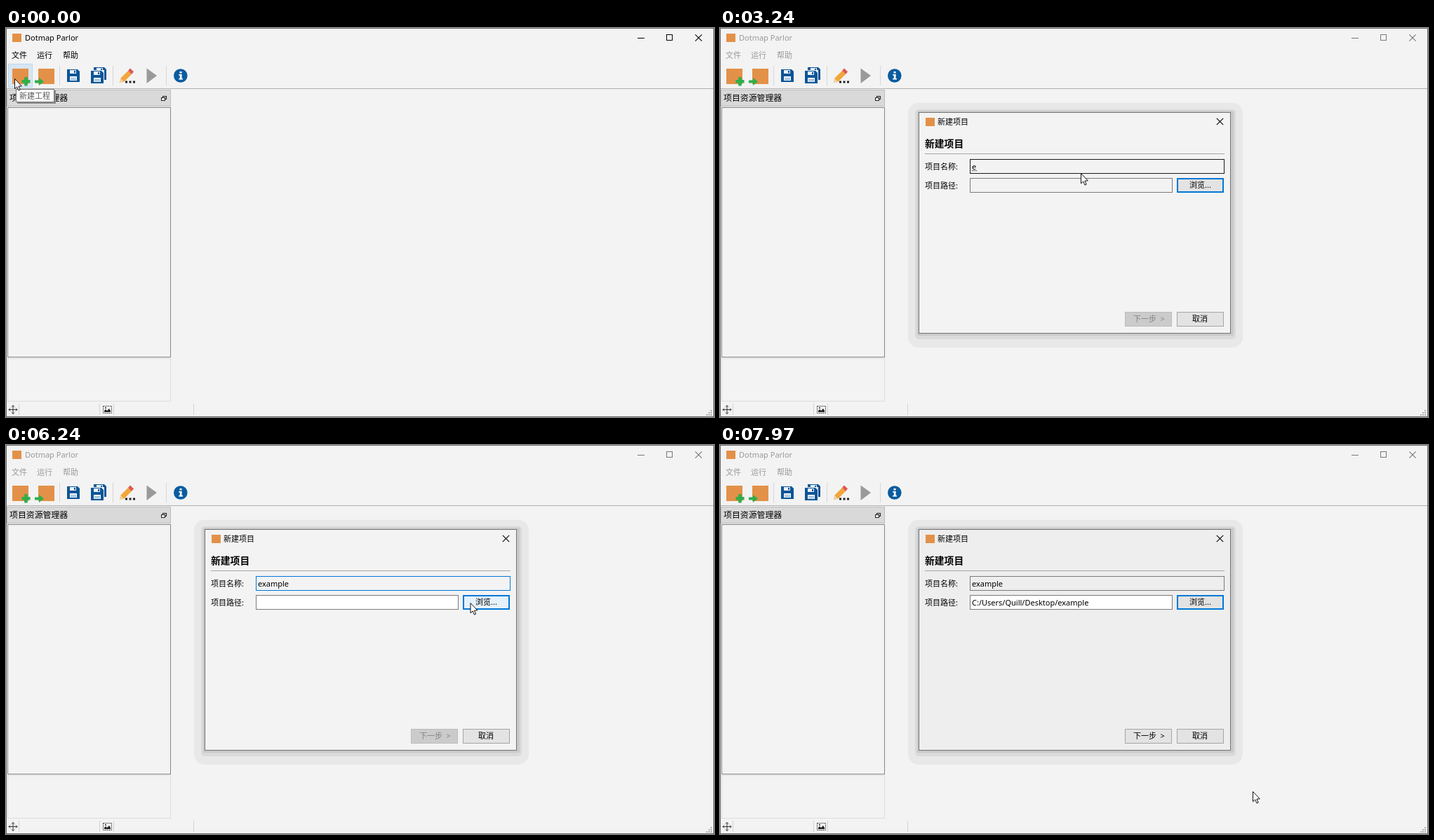
Animation, 1009 px wide and 555 px high, one loop 8 s. Source, as an HTML page with a canvas:

```html
<!DOCTYPE html>
<html lang="zh-CN">
<head>
<meta charset="utf-8">
<title>新建项目</title>
<style>
html, body { margin: 0; width: 100%; height: 100%; overflow: hidden; background: #f3f3f3; }
canvas { display: block; }
</style>
</head>
<body>
<canvas id="stage" width="1009" height="555"></canvas>
<script>
const W = 1009, H = 555, LOOP = 8000;
const FONT = '"Noto Sans", "Noto Sans CJK SC", "Noto Sans CJK", sans-serif';
const APP = 'Dotmap Parlor', LOGO = '#e39148', BLUE = '#0078d7', ICON_BLUE = '#0b5597', FACE = '#f3f3f3';
const screen = document.getElementById('stage').getContext('2d');
const layer = document.createElement('canvas');
layer.width = W;
layer.height = H;
const layerCtx = layer.getContext('2d');
let c = screen;

const clamp = v => Math.max(0, Math.min(1, v));
const easeOut = p => 1 - (1 - clamp(p)) ** 3;
const blink = (t, start) => Math.floor((t - start) / 530) % 2 === 0;

function fill(x, y, w, h, color) {
  c.fillStyle = color;
  c.fillRect(x, y, w, h);
}
// Box with a border that lies inside its bounds.
function box(x, y, w, h, face, edge, weight = 1) {
  fill(x, y, w, h, edge);
  fill(x + weight, y + weight, w - 2 * weight, h - 2 * weight, face);
}
function text(s, x, mid, color = '#000', size = 11, weight = 400) {
  c.font = `${weight} ${size}px ${FONT}`;
  c.fillStyle = color;
  c.fillText(s, x, mid + size * 0.36);
}
function path(points, color, closed) {
  c.beginPath();
  points.forEach(([x, y]) => c.lineTo(x, y));
  if (closed) {
    c.closePath();
    c.fillStyle = color;
    c.fill();
  } else {
    c.strokeStyle = color;
    c.stroke();
  }
}
function stroke(color, width, ...points) {
  c.lineWidth = width;
  path(points, color, false);
}
function shape(color, ...points) {
  path(points, color, true);
}
function disc(x, y, r, color) {
  c.beginPath();
  c.arc(x, y, r, 0, 7);
  c.fillStyle = color;
  c.fill();
}
function cross(x, y, color, r = 4.7) {
  stroke(color, 1.1, [x - r, y - r], [x + r, y + r]);
  stroke(color, 1.1, [x + r, y - r], [x - r, y + r]);
}
function chevron(x, y, dx, dy, color = '#555') {
  stroke(color, 1.1, [x - dx - 2 * dy, y - dy - 2 * dx], [x + dx, y + dy], [x - dx + 2 * dy, y - dy + 2 * dx]);
}
function arrow(x, y, dx, dy, color) {
  const ex = x + dx * 5, ey = y + dy * 5;
  stroke(color, 1.2, [x - dx * 5, y - dy * 5], [ex, ey]);
  stroke(color, 1.2, [ex - dx * 4 - dy * 4, ey - dy * 4 - dx * 4], [ex, ey], [ex - dx * 4 + dy * 4, ey - dy * 4 + dx * 4]);
}
function dropMark(x, y) {
  shape('#1e395b', [x - 4, y - 2], [x + 4, y - 2], [x, y + 2.5]);
}
function button(label, x, y, w, h, textX, { main = false, off = false, hot = false } = {}) {
  const face = off ? '#cbcbcb' : hot ? '#e5f1fb' : '#e3e3e3';
  box(x, y, w, h, face, main ? BLUE : off ? '#bdbdbd' : '#a5a5a5', main ? 2 : 1);
  text(label, textX, y + h / 2, off ? '#858585' : '#000');
}
// Window frame with its stepped drop shadow.
function frame(x, y, w, h, face) {
  [[15, 20, '#e8e8e8'], [5, 8, '#dadada'], [2, 3, '#c9c9c9']].forEach(([out, below, color]) => {
    const above = out - (below - out) / 3;
    c.beginPath();
    c.roundRect(x - out, y - above, w + out * 2 + 2, h + above + below, out);
    c.fillStyle = color;
    c.fill();
  });
  box(x, y, w, h, face, '#737373');
}
function grip(x, y) {
  for (let i = 0; i < 3; i++)
    for (let j = 0; j <= i; j++) fill(x - j * 3, y - (2 - i) * 3, 2, 2, '#b0b0b0');
}

function floppy(x, y, s) {
  shape(ICON_BLUE, [x, y], [x + s - 3, y], [x + s, y + 3], [x + s, y + s], [x, y + s]);
  fill(x + 4, y + 1, s - 9, 5, '#e9f1f8');
  fill(x + s - 8, y + 2, 2, 3, ICON_BLUE);
  fill(x + 4, y + s - 8, s - 8, 6, '#fff');
  fill(x + 5, y + s - 6, s - 10, 1, '#6f9dc4');
  fill(x + 5, y + s - 4, s - 10, 1, '#6f9dc4');
}

function toolbar(t) {
  if (t < 1250) box(3, 51, 35, 34, t < 1050 ? '#d8e6f2' : '#c4dff5', '#bcd9ef');
  const green = '#2fae4b';
  fill(9, 58, 23, 22, LOGO);
  fill(22.5, 74, 12, 4.5, green);
  fill(26.2, 70, 4.5, 12.5, green);
  fill(46, 58, 23, 22, LOGO);
  shape(green, [41, 74.5], [47, 74.5], [47, 71], [54, 76.5], [47, 82], [47, 78.5], [41, 78.5]);
  [76, 152, 228].forEach(x => fill(x, 54, 1, 28, '#d6d6d6'));
  floppy(87, 59, 18);
  floppy(125, 56, 18);
  fill(120, 60, 20, 20, FACE);
  floppy(121, 61, 18);
  shape('#f2a63b', [163, 72], [174, 61], [179, 66], [168, 77]);
  shape('#e0574f', [174, 61], [177, 57.5], [182, 62.5], [179, 66]);
  shape('#f3cfa0', [163, 72], [168, 77], [161.5, 78.5]);
  [170, 175.5, 181].forEach(x => fill(x, 75.5, 3, 3, '#222'));
  shape('#9a9a9a', [200.5, 57.5], [215, 68], [200.5, 79]);
  disc(248.8, 68, 9.8, '#0b5c9f');
  fill(247.5, 62, 3, 2.6, '#fff');
  fill(246.3, 66, 4.2, 1.8, '#fff');
  fill(247.8, 66, 2.7, 6.5, '#fff');
  fill(246.3, 71.8, 5.6, 1.8, '#fff');
}

function mainWindow(t) {
  const active = t < 1250;
  const ink = active ? '#000' : '#999';
  const control = active ? '#000' : '#777';
  box(0, 0, W, H, FACE, '#6c6c6c');
  fill(9, 8, 13, 12, LOGO);
  text(APP, 27, 14, ink);
  fill(900, 14, 10, 1, control);
  c.lineWidth = 1;
  c.strokeStyle = control;
  c.strokeRect(941.5, 9.5, 8, 8);
  cross(987, 14, control);
  text('文件', 8, 39, ink);
  text('运行', 44, 39, ink);
  text('帮助', 81, 39, ink);
  toolbar(t);
  fill(1, 86, W - 2, 1, '#b0b0b0');

  box(1, 88, 234, 24, '#d9d9d9', '#bdbdbd');
  text('项目资源管理器', 5, 100, '#000', 11.9);
  c.strokeStyle = '#222';
  c.strokeRect(223.5, 97.5, 5, 4);
  box(221, 99, 6, 5, '#eee', '#222');
  box(2, 113, 233, 357, FACE, '#858585');
  box(2, 471, 233, 62, FACE, '#dcdcdc');

  [18, 133, 153, 267].forEach(x => fill(x, 536, 1, 16, '#d3d3d3'));
  [[1, 0], [-1, 0], [0, 1], [0, -1]].forEach(([dx, dy]) => {
    const x = 10 + dx * 6, y = 544.5 + dy * 6;
    stroke('#333', 1, [10, 544.5], [x, y]);
    stroke('#333', 1, [x - dx * 2 - dy * 2, y - dy * 2 - dx * 2], [x, y], [x - dx * 2 + dy * 2, y - dy * 2 + dx * 2]);
  });
  c.setLineDash([2, 1]);
  c.strokeStyle = '#444';
  c.strokeRect(138.5, 539.5, 12, 10);
  c.setLineDash([]);
  shape('#222', [140, 548], [140, 546], [142, 544], [144, 546], [147, 543], [149, 546], [149, 548]);
  disc(142, 542, 1, '#222');
  grip(1004, 551);

  if (t < 1050) {
    fill(16, 89, 55, 19, '#8b8b8b');
    box(14, 87, 55, 19, '#fff', '#767676');
    text('新建工程', 19, 97, '#575757');
  }
}

const TYPING = [[3240, 'e'], [3400, 'ex'], [3570, 'exa'], [3760, 'exam'], [3990, 'examp'], [4600, 'example']];

function nameCaretOn(t) {
  if (t < 3240) return blink(t, 1300);
  if (t < 3290) return false;
  if (t < 4600) return t < 4460;
  return t < 4970 || (t >= 5530 && t < 6100);
}

function projectDialog(t) {
  const done = t >= 7700;
  const face = done ? '#eee' : FACE;
  frame(283, 120, 445, 316, face);
  fill(293, 128, 13, 12, LOGO);
  text('新建项目', 310, 134);
  cross(712.5, 133.5, '#000');
  text('新建项目', 292, 165, '#000', 13.8, 700);
  fill(292, 179, 427, 1, '#a6a6a6');
  text('项目名称:', 292, 198);
  text('项目路径:', 292, 225);

  const hovered = t >= 2200 && t < 3290;
  box(356, 187, 363, 21, face, hovered ? '#1a1a1a' : t < 6340 ? BLUE : '#7a7a7a');
  const name = TYPING.reduce((s, [at, typed]) => t >= at ? typed : s, '');
  text(name, 359, 198);
  const nameWidth = c.measureText(name).width;
  const composing = t >= 3240 && t < 4600;
  if (composing) for (let x = 0; x < nameWidth; x += 2) fill(359 + x, 203, 1, 1, '#000');
  if (t < 6340 && nameCaretOn(t)) fill(Math.round(359 + nameWidth) + (name ? 0 : 2), 190, 1, 15, '#000');

  box(356, 214, 289, 21, t < 4600 ? face : '#fff', '#7a7a7a');
  if (done) text('C:/Users/Quill/Desktop/example', 359, 225);
  button('浏览...', 651, 214, 67, 21, 669, { main: true, hot: t > 5760 && t < 6340 });
  button('下一步\u2002>', 577, 405, 67, 21, 589, { off: !done });
  button('取消', 651, 405, 67, 21, 673);
}

function candidates(t) {
  if (t < 3290 || t >= 4600) return;
  const right = t < 3760 ? 976 : W;
  box(360, 207, right - 360, 40, '#fff', '#d0d0d0');
  const words = t < 3400 ? '饿 额 恶 呃 鹅 俄 二' : '恶心 额下 饿下 二线 恶性 鹅行 额线';
  words.split(' ').forEach((word, i) => {
    text(String(i + 1), 374 + i * 84, 227, '#888', 11);
    text(word, 388 + i * 84, 227, i ? '#000' : BLUE, 15);
  });
}

function navItem(label, y, icon) {
  icon(176, y);
  text(label, 188, y);
}
function monitor(x, y) {
  box(x - 7, y - 6, 15, 10, '#5bb8f0', '#3d83b4');
  fill(x - 4, y + 5, 9, 2, '#6d8ba0');
}
function star(x, y) {
  const points = Array.from({ length: 10 }, (_, i) => {
    const r = i % 2 ? 2.6 : 6.3, a = i * Math.PI / 5 - Math.PI / 2;
    return [x + r * Math.cos(a), y + r * Math.sin(a)];
  });
  shape('#2f95dc', ...points);
}
function network(x, y) {
  box(x - 3, y - 6, 10, 8, '#4aa7e0', '#2b77ad');
  disc(x - 2, y + 2, 4.5, '#2d8ac7');
  fill(x + 2, y + 4, 4, 1.5, '#6d8ba0');
}

function folderDialog(t) {
  const steel = '#4c607a', navy = '#1e395b', line = '#dcdcdc';
  frame(147, 92, 799, 423, '#fdfdfd');
  fill(159, 183, 76, 253, '#f4f4f4');
  fill(155, 100, 13, 12, LOGO);
  text('打开文件夹', 173, 106);
  cross(931.5, 105.5, '#000');

  arrow(165, 135, -1, 0, '#c6c6c6');
  arrow(192, 135, 1, 0, '#c6c6c6');
  chevron(213, 135, 0, 1.1, '#c6c6c6');
  arrow(232, 135, 0, -1, '#444');
  box(243, 124, 498, 22, '#fdfdfd', '#d4d4d4');
  fill(248, 127, 11, 15, '#fbdc7e');
  fill(257, 135, 3, 7, '#e9bd4b');
  [270, 326, 370].forEach(x => chevron(x, 135, 1.2, 0));
  text('此电脑', 281, 135);
  text('桌面', 337, 135);
  text('example', 382, 135);
  chevron(712.5, 135, 0, 2);
  fill(721, 125, 1, 20, line);
  c.beginPath();
  c.arc(731, 135, 4, -0.6, 4.6);
  c.strokeStyle = '#555';
  c.lineWidth = 1.3;
  c.stroke();
  shape('#555', [730, 128], [734, 131], [730, 134]);
  box(751, 124, 184, 22, '#fdfdfd', '#d4d4d4');
  text('在 example 中搜索', 760, 135, '#666');
  c.beginPath();
  c.arc(923, 133, 3.2, 0, 7);
  c.strokeStyle = '#444';
  c.stroke();
  stroke('#444', 1.5, [920.7, 135.5], [917, 139]);

  text('组织', 163, 166, navy);
  dropMark(194, 166);
  text('新建文件夹', 225, 166, navy);
  for (let y = 160; y < 172; y += 4) {
    box(860, y, 5, 3, '#fff', '#a9adb3');
    fill(866, y + 1, 4, 1, '#8d949c');
    fill(871, y + 1, 4, 1, '#8d949c');
  }
  dropMark(887, 166);
  disc(924.5, 165.5, 7.3, '#0f63b0');
  text('?', 922, 165.5, '#fff', 11, 700);
  fill(148, 180, 797, 1, '#e4e4e4');

  [['名称', 350], ['修改日期', 588], ['类型', 718], ['大小', 827]].forEach(([s, x]) => text(s, x, 193, steel));
  [581, 712, 821, 893].forEach(x => fill(x, 181, 1, 25, '#e4e4e4'));
  chevron(463, 183, 0, -1.6, '#666');
  text('没有与搜索条件匹配的项。', 575, 227, '#6d6d6d');

  fill(148, 253, 183, 22, '#d9d9d9');
  navItem('快速访问', 206, star);
  navItem('FogShelf - Personal', 235, (x, y) => disc(x, y, 5.5, '#1479cf'));
  navItem('此电脑', 264, monitor);
  navItem('网络', 293, network);

  fill(148, 441, 797, 73, FACE);
  text('文件夹:', 265, 463);
  box(305, 451, 625, 24, '#fff', BLUE);
  if (blink(t, 6360)) fill(309, 455, 1, 16, '#000');
  button('选择文件夹', 745, 481, 93, 21, 764, { main: true, hot: t > 7480 });
  button('取消', 851, 481, 78, 21, 879);
  grip(940, 510);
}

// Draws a window on its own layer, then fades and scales it about its centre.
function popup(draw, t, cx, cy, amount) {
  if (amount <= 0) return;
  if (amount >= 1) return draw(t);
  c = layerCtx;
  c.clearRect(0, 0, W, H);
  draw(t);
  c = screen;
  const s = 0.92 + 0.08 * amount;
  c.globalAlpha = amount;
  c.drawImage(layer, cx - cx * s, cy - cy * s, W * s, H * s);
  c.globalAlpha = 1;
}

const POINTER = [
  [0, 12.5, 72.5], [1780, 12.5, 72.5], [1930, 158, 125], [2030, 211, 155], [2250, 470, 213],
  [2430, 561, 219], [2580, 558, 218], [2630, 556, 218], [2850, 520, 215], [3000, 514.5, 207.5],
  [5480, 514.5, 207.5], [5530, 557.5, 216.5], [5800, 645, 222], [6100, 662, 225.5], [6550, 662, 225.5],
  [6800, 703, 339], [7130, 800, 499], [7250, 806.5, 505.5], [7420, 806.5, 505.5], [7560, 792, 493],
  [7700, 780, 494], [7970, 759.5, 494.5], [8000, 759.5, 494.5]
];

function pointer(t) {
  const i = POINTER.findIndex(([at]) => at > t);
  const [t0, x0, y0] = POINTER[i - 1], [t1, x1, y1] = POINTER[i];
  const p = (t - t0) / (t1 - t0);
  const x = x0 + (x1 - x0) * p, y = y0 + (y1 - y0) * p;
  const points = [[0, 0], [0, 14.3], [3.2, 11.4], [5.5, 16.6], [7.7, 15.6], [5.4, 10.6], [9.8, 10.4]]
    .map(([dx, dy]) => [x + dx, y + dy]);
  shape('#fff', ...points);
  stroke('#111', 1, ...points, points[0]);
}

function render(t) {
  c = screen;
  mainWindow(t);
  popup(projectDialog, t, 505.5, 278, easeOut((t - 1256) / 250));
  candidates(t);
  const shown = t < 7600 ? easeOut((t - 6300) / 240) : 1 - clamp((t - 7600) / 180);
  popup(folderDialog, t, 546, 303, shown);
  pointer(t);
}

function tick() {
  render(performance.now() % LOOP);
  requestAnimationFrame(tick);
}
tick();
</script>
</body>
</html>
```
